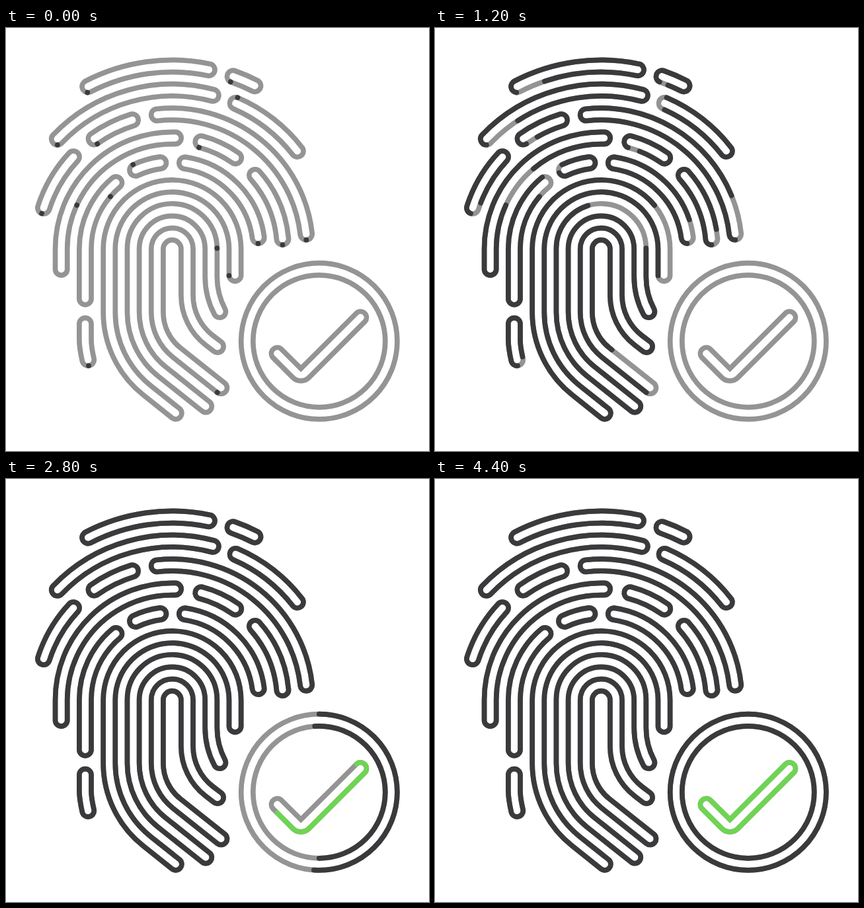
Animation, 640 px wide and 640 px high, one loop 5100 ms. Source, as an HTML page without scripts:

```html
<!DOCTYPE html>
<html lang="en">
<head>
<meta charset="utf-8">
<title>Fingerprint check</title>
<style>
  html, body { margin: 0; width: 100%; height: 100%; overflow: hidden; background: #fff; }
  svg { display: block; width: 100vw; height: 100vh; }
  .base, .ink { fill: none; stroke-width: 7.7; }
  .base { stroke: #949494; }
  .ink { stroke: #3a3a3c; stroke-linecap: round; }
  .ok { stroke: #6fd453; }
  .print { animation: scan 5.1s infinite; }
  .badge { animation: confirm 5.1s infinite; }

  /* each outline is 100 units long */
  @keyframes scan {
    0% { stroke-dasharray: .01 200; animation-timing-function: cubic-bezier(.3, 0, 0, 1); }
    45.1%, 100% { stroke-dasharray: 101 200; }
  }
  @keyframes confirm {
    0% { stroke-dasharray: .01 200; opacity: 0; animation-timing-function: step-end; }
    44.12% { stroke-dasharray: .01 200; opacity: 1; animation-timing-function: cubic-bezier(.3, 0, 0, 1); }
    89.22%, 100% { stroke-dasharray: 101 200; opacity: 1; }
  }
</style>
</head>
<body>
<svg viewBox="0 0 640 640" xmlns="http://www.w3.org/2000/svg">
  <defs>
    <!-- ridges share one centre at 0,0 -->
    <g id="ridges" transform="translate(251.4 334.2)">
      <!-- top rows -->
      <path pathLength="100" d="M-128.2-236.6A9.1 9.1 0 0 1-131.5-253.7A285.75 285.75 0 0 1 57.9-279.8A9.1 9.1 0 0 1 54.3-262A267.6 267.6 0 0 0-123.1-237.6A9.1 9.1 0 0 1-128.2-236.6Z"/>
      <path pathLength="100" d="M88.4-252.6A9.1 9.1 0 0 1 94.4-269.7A285.75 285.75 0 0 1 129.7-254.6A9.1 9.1 0 0 1 121.5-238.4A267.6 267.6 0 0 0 88.4-252.6Z"/>
      <path pathLength="100" d="M-173.5-157.3A9.1 9.1 0 0 1-180.1-172.6A249.45 249.45 0 0 1 64.6-240.9A9.1 9.1 0 0 1 59.9-223.4A231.3 231.3 0 0 0-167-160.1A9.1 9.1 0 0 1-173.5-157.3Z"/>
      <path pathLength="100" d="M99.1-228.9A249.45 249.45 0 0 1 197.1-152.9A9.1 9.1 0 0 1 182.8-141.8A231.3 231.3 0 0 0 91.8-212.3A9.1 9.1 0 0 1 99.1-228.9Z"/>
      <!-- third row -->
      <path pathLength="100" d="M202.9-13.5A9.1 9.1 0 0 1 193.8-21.6A195 195 0 0 0-22.4-193.7A9.1 9.1 0 0 1-24.5-211.7A213.15 213.15 0 0 1 211.8-23.6A9.1 9.1 0 0 1 202.9-13.5Z"/>
      <path pathLength="100" d="M-113.2-158.8A9.1 9.1 0 0 1-123.8-173.5A213.15 213.15 0 0 1-62-203.9A9.1 9.1 0 0 1-56.7-186.6A195 195 0 0 0-113.2-158.8Z"/>
      <path pathLength="100" d="M-197.4-53.5A9.1 9.1 0 0 1-203.1-64.8A213.15 213.15 0 0 1-155.4-145.9A9.1 9.1 0 0 1-142.2-133.5A195 195 0 0 0-185.8-59.3A9.1 9.1 0 0 1-197.4-53.5Z"/>
      <!-- fourth row -->
      <path pathLength="100" d="M-144.2-66.2A158.7 158.7 0 0 0-158.7 0V31.4A9.1 9.1 0 0 1-176.85 31.4V0A176.85 176.85 0 0 1 4.9-176.8A9.1 9.1 0 0 1 4.4-158.6A158.7 158.7 0 0 0-144.2-66.2Z"/>
      <path pathLength="100" d="M40.7-153.4A9.1 9.1 0 0 1 45.3-170.9A176.85 176.85 0 0 1 101.4-144.9A9.1 9.1 0 0 1 91-130A158.7 158.7 0 0 0 40.7-153.4Z"/>
      <path pathLength="100" d="M167-6.1A9.1 9.1 0 0 1 158-14.4A158.7 158.7 0 0 0 118.3-105.8A9.1 9.1 0 0 1 131.8-117.9A176.85 176.85 0 0 1 176.1-16A9.1 9.1 0 0 1 167-6.1Z"/>
      <!-- fifth row -->
      <path pathLength="100" d="M-93.4-79.2A122.4 122.4 0 0 0-122.4 0V76.1A9.1 9.1 0 0 1-140.55 76.1V0A140.55 140.55 0 0 1-90.1-107.8A9.1 9.1 0 0 1-78.5-93.9A122.4 122.4 0 0 0-93.4-79.2Z"/>
      <path pathLength="100" d="M-59.2-127.5A140.55 140.55 0 0 1-18.6-139.3A9.1 9.1 0 0 1-16.2-121.3A122.4 122.4 0 0 0-51.5-111A9.1 9.1 0 0 1-59.2-127.5Z"/>
      <path pathLength="100" d="M130-8.1A9.1 9.1 0 0 1 121.3-16A122.4 122.4 0 0 0 17.2-121.2A9.1 9.1 0 0 1 19.8-139.1A140.55 140.55 0 0 1 139.3-18.3A9.1 9.1 0 0 1 130-8.1Z"/>
      <path pathLength="100" d="M-126.4 176.8A9.1 9.1 0 0 1-136.1 169.6Q-140.55 149-140.55 138V112.8A9.1 9.1 0 0 1-122.4 112.8V138Q-122.4 148-118.3 166A9.1 9.1 0 0 1-126.4 176.8Z"/>
      <!-- core loops -->
      <path pathLength="100" d="M86.1 40.5V0A86.1 86.1 0 0 0-86.1 0V95.8A141.7 141.7 0 0 0-32.6 206.7L11.6 241.9A9.1 9.1 0 0 1 .3 256.1L-43.9 220.9A159.85 159.85 0 0 1-104.25 95.8V0A104.25 104.25 0 0 1 104.25 0V40.5A9.1 9.1 0 0 1 86.1 40.5Z"/>
      <path pathLength="100" d="M67.95-1V42A105 105 0 0 0 80.2 91.1A9.1 9.1 0 0 1 64.2 99.7A123.15 123.15 0 0 1 49.8 42V0A49.8 49.8 0 0 0-49.8 0V95.8A105.4 105.4 0 0 0-10 178.3L57 231.6A9.1 9.1 0 0 1 45.7 245.8L-21.3 192.5A123.55 123.55 0 0 1-67.95 95.8V0A67.95 67.95 0 0 1 67.95-1Z"/>
      <path pathLength="100" d="M68.3 217.3L1.3 164.1A87.25 87.25 0 0 1-31.65 95.8V0A31.65 31.65 0 0 1 31.65 0V70A77 77 0 0 0 61.5 130.9L74.2 140.6A9.1 9.1 0 0 1 63 155L50.4 145.3A95.15 95.15 0 0 1 13.5 70V0A13.5 13.5 0 0 0-13.5 0V95.8A69.1 69.1 0 0 0 12.6 149.9L79.7 203.1A9.1 9.1 0 0 1 68.3 217.3Z"/>
    </g>
    <g id="rings">
      <path pathLength="100" d="M473.8 355.7a118.1 118.1 0 0 1 0 236.2a118.1 118.1 0 0 1 0-236.2Z"/>
      <path pathLength="100" d="M473.8 573.8a100 100 0 0 0 0-200a100 100 0 0 0 0 200Z"/>
    </g>
    <path id="tick" pathLength="100" d="M530.6 431A9.1 9.1 0 0 1 543.4 443.8L458.5 528.8A17.4 17.4 0 0 1 433.9 528.8L403.5 498.3A9.1 9.1 0 0 1 416.3 485.5L446.2 515.3Z"/>
  </defs>

  <g class="base">
    <use href="#ridges"/>
    <use href="#rings"/>
    <use href="#tick"/>
  </g>
  <use class="ink print" href="#ridges"/>
  <use class="ink badge" href="#rings"/>
  <use class="ink badge ok" href="#tick"/>
</svg>
</body>
</html>
```
